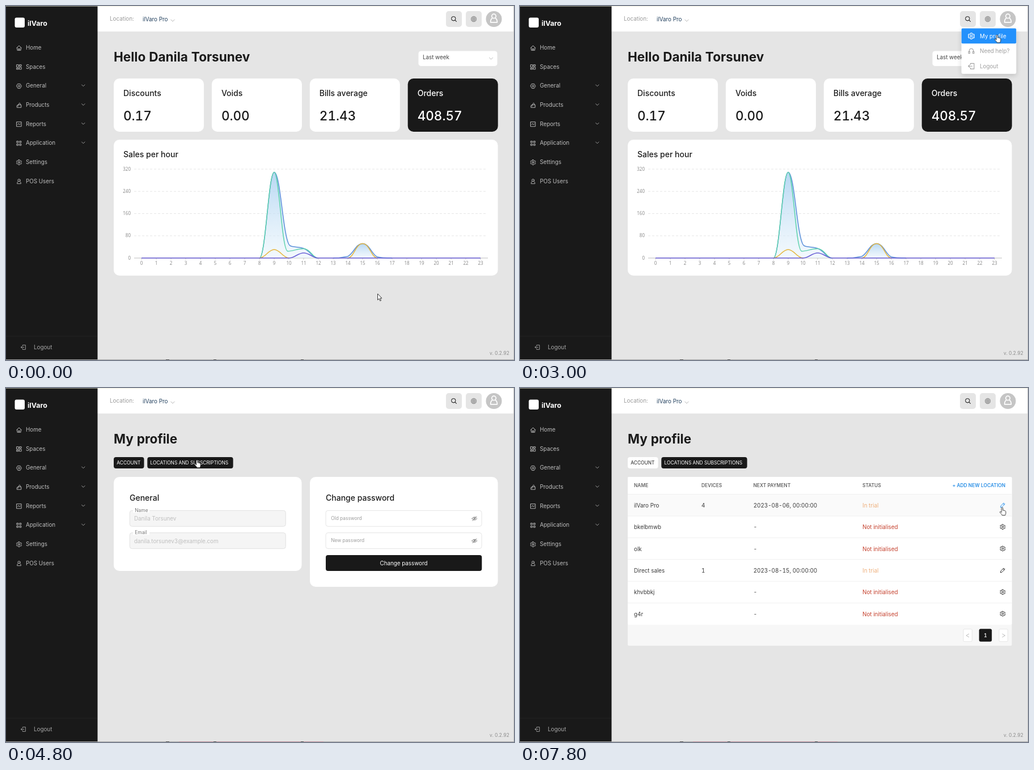
Animation, 896 px wide and 625 px high, one loop 8000 ms. Source, as an HTML page:

```html
<!DOCTYPE html>
<html lang="en">
<head>
<meta charset="utf-8">
<title>Back office profile</title>
<style>
html, body { margin: 0; width: 100%; height: 100%; overflow: hidden; background: #e5e5e5; }
svg { display: block; }
text { font-family: Inter, "Liberation Sans", sans-serif; font-variant-numeric: tabular-nums; white-space: pre; }
.axis text { font-family: "Noto Sans", "Open Sans", sans-serif; }
.icon { fill: none; stroke: currentColor; stroke-width: 1.5; stroke-linecap: round; stroke-linejoin: round; }

.anim { animation: 8s step-end infinite; }
#home { animation-name: home; }
#profile { animation-name: profile; }
#account { animation-name: account; }
#table { animation-name: table; }
#focus { animation-name: focus; }
#menu { animation-name: menu; }
#active { animation-name: active; }
#tab1 { animation-name: tab1; }
#tab2 { animation-name: tab2; }
#tab1text { animation-name: tab1text; }
#tab2text { animation-name: tab2text; }
#strip { animation-name: strip; }
#edit { animation-name: edit; }
#fringe { animation-name: fringe; }
#arrow { animation-name: arrow; }
#hand { animation-name: hand; }
#cursor { animation-name: move; }

@keyframes home { 0% { visibility: visible } 40%, 100% { visibility: hidden } }
@keyframes profile { 0% { visibility: hidden } 40%, 100% { visibility: visible } }
@keyframes account { 0% { visibility: hidden } 40% { visibility: visible } 65%, 100% { visibility: hidden } }
@keyframes table { 0% { visibility: hidden } 65%, 100% { visibility: visible } }
@keyframes focus { 0% { stroke: #e6e6e6 } 10% { stroke: #a3c6d8 } 15%, 100% { stroke: #e6e6e6 } }
@keyframes menu { 0% { opacity: 0 } 17.5% { opacity: .6 } 20% { opacity: 1 } 42.5% { opacity: .4 } 45%, 100% { opacity: 0 } }
@keyframes active { 0% { opacity: 0 } 32.5% { opacity: 1; fill: #2391fc } 40% { opacity: 1; fill: #389dfd } 45%, 100% { opacity: 0 } }
@keyframes tab1 { 0% { fill: #191919 } 65%, 100% { fill: #fff } }
@keyframes tab1text { 0% { fill: #fff } 65%, 100% { fill: #222 } }
@keyframes tab2 { 0% { fill: #fff } 57.5% { fill: #4c4c4c } 60%, 100% { fill: #191919 } }
@keyframes tab2text { 0% { fill: #222 } 57.5%, 100% { fill: #fff } }
@keyframes edit { 0% { color: #222 } 97.5%, 100% { color: #2490f0 } }
@keyframes fringe { 0% { opacity: 0 } 55%, 100% { opacity: 1 } }
@keyframes strip {
  0% { transform: translateY(0); opacity: 0 }
  70% { transform: translateY(0); opacity: 1 }
  72.5% { transform: translateY(38.4px); opacity: 1 }
  75% { transform: translateY(76.8px); opacity: 1 }
  80% { transform: translateY(115.2px); opacity: 1 }
  82.5% { transform: translateY(153.6px); opacity: 1 }
  85% { transform: translateY(192px); opacity: 1 }
  90% { transform: translateY(192px); opacity: 0 }
  95% { transform: translateY(115.2px); opacity: 1 }
  97.5%, 100% { transform: translateY(0); opacity: 1 }
}
@keyframes hand {
  0% { visibility: hidden } 17.5% { visibility: visible } 40% { visibility: hidden }
  57.5% { visibility: visible } 67.5% { visibility: hidden } 97.5%, 100% { visibility: visible }
}
@keyframes arrow {
  0% { visibility: visible } 17.5% { visibility: hidden } 40% { visibility: visible }
  57.5% { visibility: hidden } 67.5% { visibility: visible } 97.5%, 100% { visibility: hidden }
}
/* the pointer is sampled every 200 ms */
@keyframes move {
  0% { transform: translate(655px, 508px); animation-timing-function: steps(3) }
  7.5% { transform: translate(800px, 265px) }
  10% { transform: translate(842px, 100px) }
  12.5% { transform: translate(852px, 66px) }
  15% { transform: translate(858px, 36px) }
  17.5% { transform: translate(861px, 24px) }
  22.5% { transform: translate(861px, 24px); animation-timing-function: steps(6) }
  37.5% { transform: translate(841.5px, 51px) }
  42.5% { transform: translate(841.5px, 51px); animation-timing-function: steps(4) }
  52.5% { transform: translate(786px, 299px) }
  55% { transform: translate(560px, 212px) }
  57.5% { transform: translate(352px, 136px) }
  60% { transform: translate(337px, 127px) }
  65% { transform: translate(337px, 127px); animation-timing-function: steps(5) }
  77.5% { transform: translate(620px, 300px); animation-timing-function: steps(5) }
  90% { transform: translate(846px, 431px) }
  95% { transform: translate(850px, 310px) }
  97.5%, 100% { transform: translate(850.5px, 211px) }
}
</style>
</head>
<body>
<svg width="896" height="625" viewBox="0 0 896 625">
  <defs>
    <linearGradient id="sky" x2="0" y2="1">
      <stop stop-color="#a9d0f0" stop-opacity=".85"/>
      <stop offset="1" stop-color="#e3f1fb" stop-opacity=".45"/>
    </linearGradient>
    <filter id="shadow" x="-20%" y="-20%" width="140%" height="150%">
      <feDropShadow dx="0" dy="3" stdDeviation="4" flood-opacity=".16"/>
    </filter>
    <symbol id="i-home" viewBox="0 0 16 16"><path d="M1 8 8 1.5 15 8M3 7v7.5h10V7M6.5 14V10h3v4"/></symbol>
    <symbol id="i-spaces" viewBox="0 0 16 16"><path d="M1.5 1.5h5v7h-5zM9.500 1.5h5v4h-5zM1.500 11.500h5v3h-5zM9.500 8.500h5v6h-5z"/></symbol>
    <symbol id="i-general" viewBox="0 0 16 16"><path d="M5 1.5h6L15 8l-4 6.500H5L1 8z"/><circle cx="8" cy="8" r="2.600"/></symbol>
    <symbol id="i-products" viewBox="0 0 16 16"><path d="M5 7h9v7.500H2V10zM5 7v4M7 7c0-7 5-7 5 0"/></symbol>
    <symbol id="i-reports" viewBox="0 0 16 16"><path d="M1.500 1.500h13v13h-13zM4 9l2.500-3 3 3.500L12 6.500"/></symbol>
    <symbol id="i-application" viewBox="0 0 16 16"><path d="M2 2h4v4H2zM10 2h4v4h-4zM2 10h4v4H2zM10 10h4v4h-4z"/></symbol>
    <symbol id="i-gear" viewBox="0 0 16 16"><path d="M6.500 1h3l.6 2.200 1.500.8 2.200-.6 1.500 2.600-1.600 1.600v1l1.600 1.600-1.500 2.600-2.200-.6-1.500.8L9.500 15h-3l-.6-2.200-1.500-.8-2.200.6L.7 10l1.600-1.600v-1L.7 6l1.500-2.600 2.200.6 1.500-.8z"/><circle cx="8" cy="8" r="2.300"/></symbol>
    <symbol id="i-user" viewBox="0 0 16 16"><circle cx="8" cy="4.800" r="3.300"/><path d="M5.500 8C3.500 9 2.800 11 2.800 14.500h10.400C13.200 11 12.500 9 10.500 8"/></symbol>
    <symbol id="i-logout" viewBox="0 0 16 16"><path d="M6 4V1.500h8.500v13H6V12M1 8h9M4 5 1 8l3 3"/></symbol>
    <symbol id="i-search" viewBox="0 0 16 16"><circle cx="7" cy="7" r="5.200"/><path d="m11 11 3.500 3.500"/></symbol>
    <symbol id="i-globe" viewBox="0 0 16 16"><circle cx="8" cy="8" r="6.800"/><ellipse cx="8" cy="8" rx="3" ry="6.800"/><path d="M1.500 6h13M1.500 10h13M8 1v14"/></symbol>
    <symbol id="i-help" viewBox="0 0 16 16"><path d="M4.500 13.500H1.500V9h3zM14.500 9h-3v4.500h3zM3 9C3 0 13 0 13 9"/></symbol>
    <symbol id="i-eye" viewBox="0 0 16 16"><path d="M1 8C4 2.500 12 2.500 15 8 12 13.500 4 13.500 1 8zM2.500 14 13.500 2"/><circle cx="8" cy="8" r="2.300"/></symbol>
    <symbol id="i-pen" viewBox="0 0 16 16"><path d="M2 14l.8-4L11 1.800 14.200 5 6 13.200zM9 4l3 3"/></symbol>
  </defs>
  <rect width="896" height="625" fill="#e5e5e5"/>
  <rect width="896" height="45" fill="#fff"/>
  <g id="frame"></g>
  <g id="home" class="anim"></g>
  <g id="profile" class="anim"></g>
  <g id="account" class="anim"></g>
  <g id="table" class="anim"></g>
  <g id="menu" class="anim"></g>
  <g id="edge">
    <rect width="896" height="1" fill="#e9e8cf" opacity=".6"/>
    <rect x="895" width="1" height="625" fill="#c9c9c9"/>
    <rect y="624" width="896" height="1" fill="#a6a6a6"/>
    <rect id="fringe" class="anim" x="305" y="624" width="255" height="1" fill="#b98c98"/>
    <path d="M282 624.500h6M366 624.500h5M520 624.500h5" stroke="#444"/>
  </g>
  <g id="cursor" class="anim" fill="#fff" stroke="#222" stroke-width=".9" stroke-linejoin="round">
    <path id="arrow" class="anim" d="M.5 0V11L3 8.700 4.800 12.700 6.500 12 4.800 8H8z"/>
    <path id="hand" class="anim" d="M-1.200 7.500V1.200a1.200 1.200 0 0 1 2.400 0V5q2.500-.2 3.900.7T6.300 9q0 2.200-1.200 4.800H0Q-1 11.500-3.500 9.300q-1.200-1.400-.2-1.900t2.500 1.300z"/>
  </g>
</svg>
<script>
const BODY = 9.84, SMALL = 8.4, DARK = '#191919';
const put = (id, ...parts) => document.getElementById(id).innerHTML = parts.flat().join('');

// y is the middle of the capitals
const text = (x, y, str, { size = BODY, fill = '#222', weight = 400, anchor = 'start', attr = '' } = {}) =>
  `<text x="${x}" y="${(y + size * .364).toFixed(2)}" font-size="${size}" font-weight="${weight}" fill="${fill}" text-anchor="${anchor}" ${attr}>${str}</text>`;
const box = (x, y, w, h, r, fill = '#fff', attr = '') =>
  `<rect x="${x}" y="${y}" width="${w}" height="${h}" rx="${r}" fill="${fill}" ${attr}/>`;
const icon = (name, cx, cy, size, color, attr = 'class="icon"') =>
  `<g ${attr} color="${color}"><use class="icon" href="#i-${name}" x="${cx - size / 2}" y="${cy - size / 2}" width="${size}" height="${size}"/></g>`;
const chevron = (x, y, color, r = 3) =>
  `<path d="M${x - r} ${y - r / 2}l${r} ${r} ${r} ${-r}" fill="none" stroke="${color}" stroke-width="1"/>`;
const line = (x1, y, x2, color, attr = '') => `<path d="M${x1} ${y}H${x2}" stroke="${color}" ${attr}/>`;
const title = (x, y, str, fill = '#1c1c1c') => text(x, y, str, { size: 14, weight: 500, fill });
const heading = str => text(190, 90, str, { size: 22.5, weight: 700, fill: '#1a1a1a' });

// sidebar and header
const nav = ['Home', 'Spaces', 'General', 'Products', 'Reports', 'Application', 'Settings', 'POS Users'];
const navIcons = ['home', 'spaces', 'general', 'products', 'reports', 'application', 'gear', 'user'];
put('frame',
  box(0, 0, 161.5, 625, 0, DARK),
  box(15.5, 20.500, 17.5, 17.5, 3),
  text(38, 30, 'ilVaro', { size: 12.4, weight: 700, fill: '#fff' }),
  nav.map((label, i) => {
    const y = 73.5 + i * 33.66;
    return icon(navIcons[i], 23, y + .6, 10, '#c4c4c4') + text(35, y, label, { fill: '#bebebe' }) +
      (i > 1 && i < 6 ? chevron(136.3, y - .6, '#9c9c9c') : '');
  }),
  line(0, 583, 161, '#232323'),
  icon('logout', 30.5, 602.5, 9.5, '#a8a8a8'),
  text(49, 602.5, 'Logout', { fill: '#a8a8a8' }),
  text(183, 22.5, 'Location:', { fill: '#9b9b9b' }),
  text(241, 23, 'ilVaro Pro', { fill: '#23415f' }),
  chevron(294, 25.500, '#b5b5b5', 3.5),
  box(776, 9, 28, 28, 5, '#e5e5e5'), icon('search', 790, 23, 11, '#222'),
  box(811, 9, 28, 28, 5, '#e5e5e5'), icon('globe', 825, 23, 11, '#999'),
  '<circle cx="860.500" cy="23" r="14" fill="#c5c5c5"/>', icon('user', 860.5, 21.5, 18, '#fff'),
  text(888, 613, 'v. 0.2.92', { size: 8.3, fill: '#8c8c8c', anchor: 'end' })
);

// dashboard
const hourX = h => 239 + h * 26;
const salesY = v => 445 - v * 157 / 320;
const rise = 'M447 445C458 445 463 293.500 473 293.500';
const drop = 'C484 293.500 488 401 499 421C502 427 514 424 525 428C538 433 540 445 550 445';
const bump = 'M577 445C590 445 594 444 603 442C613 437 617 419.500 629 419.500C641 419.500 646 440 655 443C662 445 668 445 681 445';
const curves = {
  '#5b8fd9': rise + drop + bump,
  '#5fd3ae': rise + 'C482 293.500 486 432 497 433C506 433 515 428 526 428.500C538 430 541 445 550 445',
  '#e6b53c': 'M447 445C457 445 463 430 473 430S489 445 499 445M603 445C613 445 617 419.500 629 419.500S645 445 655 445',
  '#6a5fd6': 'M239 445H499C509 445 515 436 525 436S541 445 551 445H837'
};
const stats = [['Discounts', '0.17'], ['Voids', '0.00'], ['Bills average', '21.43'], ['Orders', '408.57']];
const axis = { size: 8, fill: '#8c8c8c' };
put('home',
  heading('Hello Danila Torsunev'),
  box(727, 79, 140, 27.5, 5, '#fff', 'id="focus" class="anim" stroke-width="1"'),
  text(735, 90, 'Last week', { fill: '#444' }),
  chevron(855.5, 92.5, '#b9b9b9', 3.3),
  stats.map(([name, value], i) => {
    const x = 190 + i * 172.9, last = i === 3;
    return box(x, 128, 159, 94, 10, last ? DARK : '#fff') + title(x + 17, 153.5, name, last ? '#fff' : '#1c1c1c') +
      text(x + 17, 194, value, { size: 22.5, weight: 500, fill: last ? '#fff' : '#1a1a1a' });
  }),
  box(190, 236, 677.5, 240, 10),
  title(207, 261.5, 'Sales per hour'),
  '<g class="axis">',
  [0, 80, 160, 240, 320].map(v => text(220, salesY(v) - .3, v, { ...axis, anchor: 'end' }) +
    (v ? line(226, salesY(v), 849, '#e6e6e6', 'stroke-dasharray="4 3"') : line(226, 445, 850, '#bdbdbd'))),
  Array.from({ length: 24 }, (_, h) => text(hourX(h), 454.5, h, { ...axis, anchor: 'middle' }) +
    `<path d="M${hourX(h)} 445v3" stroke="#bdbdbd" stroke-width=".8"/>`),
  '</g>',
  [rise + drop, bump].map(d => `<path d="${d}Z" fill="url(#sky)"/>`),
  Object.entries(curves).map(([color, d]) => `<path d="${d}" fill="none" stroke="${color}" stroke-width="1.5"/>`)
);

// profile page
const tab = (n, x, w, label) => box(x, 122, w, 20, 4, '#fff', `id="tab${n}" class="anim"`) +
  text(x + 5.3, 132, label, { size: SMALL, attr: `id="tab${n}text" class="anim"` });
put('profile', heading('My profile'), tab(1, 190, 53.5, 'ACCOUNT'), tab(2, 249.3, 151.3, 'LOCATIONS AND SUBSCRIPTIONS'));

const fixed = (y, label, value) => box(218.3, y + .3, 275, 28, 4, '#f5f5f5', 'stroke="#dfdfdf" stroke-width=".9"') +
  box(224, y - 4, 29, 8, 0) + text(227.3, y, label, { size: SMALL, fill: '#777' }) +
  text(226, y + 14.7, value, { fill: '#bfbfbf' });
const secret = (y, label) => box(564, y + .3, 275, 28, 4, '#fff', 'stroke="#e2e2e2" stroke-width=".9"') +
  text(573.3, y + 13.7, label, { size: SMALL, fill: '#9c9c9c' }) + icon('eye', 826.3, y + 14.5, 10, '#777');
put('account',
  box(190, 157, 331.5, 166, 10), title(218, 194, 'General'),
  fixed(216, 'Name', 'Danila Torsunev'), fixed(255.3, 'Email', 'danila.torsunev3@example.com'),
  box(536, 157, 331.5, 194, 10), title(564, 194, 'Change password'),
  secret(216, 'Old password'), secret(255.3, 'New password'),
  box(564, 295, 275.3, 28, 4, DARK),
  text(701.5, 309, 'Change password', { fill: '#fff', anchor: 'middle' })
);

// locations table
const rows = [['ilVaro Pro', '4', '2023-08-06'], ['bkelbmwb'], ['olk'], ['Direct sales', '1', '2023-08-15'], ['khvbbkj'], ['g4r']];
const head = { size: SMALL, weight: 600, fill: '#666' };
const cell = { fill: '#3a3a3a' };
const pager = (x, d) => box(x, 425.7, 15.3, 22, 2, '#fff', 'stroke="#e0e0e0" stroke-width=".8"') +
  `<path d="${d}" fill="none" stroke="#b8b8b8"/>`;
put('table',
  box(190, 157, 677.5, 298, 2, '#f7f7f7'),
  box(190, 157, 677.5, 261, 2),
  box(190, 188, 677.5, 38, 0, '#fafafa', 'id="strip" class="anim"'),
  [['NAME', 201], ['DEVICES', 320], ['NEXT PAYMENT', 411.5], ['STATUS', 604]].map(([s, x]) => text(x, 172, s, head)),
  text(856, 172, '+ ADD NEW LOCATION', { ...head, fill: '#2a8fe6', anchor: 'end' }),
  rows.map(([name, devices, date], i) => {
    const y = 207.3 + i * 38.35;
    return line(190, 187.6 + i * 38.4, 867.5, '#f0f0f0') + text(201, y, name, cell) +
      (devices ? text(320, y, devices, cell) : '') +
      text(411.7, y, date ? date + ', 00:00:00' : '-', cell) +
      text(604, y, date ? 'In trial' : 'Not initialised', { fill: date ? '#eeaf7b' : '#c5402d' }) +
      icon(date ? 'pen' : 'gear', 851.3, y - .5, 10, '#222', i ? '' : 'id="edit" class="anim"');
  }),
  pager(782, 'M792 434l-5 3 5 3'), box(809.7, 425.3, 22.5, 22.5, 3, DARK), pager(845, 'M850.500 434l5 3-5 3'),
  text(821, 436.5, '1', { size: SMALL, weight: 600, fill: '#fff', anchor: 'middle' })
);

// account menu
const entries = [['gear', 'My profile'], ['help', 'Need help?'], ['logout', 'Logout']];
const entry = ([name, label], i, color) => icon(name, 796, 53 + i * 26.6, 12, color) +
  text(811, 53 + i * 26.6, label, { fill: color });
put('menu',
  box(778.7, 39.5, 96.5, 80.3, 3, '#fff', 'filter="url(#shadow)"'),
  entries.map((e, i) => entry(e, i, '#a0a0a0')),
  '<g id="active" class="anim">',
  '<rect x="778.700" y="39.500" width="96.500" height="26.700" rx="2"/>',
  entry(entries[0], 0, '#fff'),
  '</g>'
);
</script>
</body>
</html>
```
